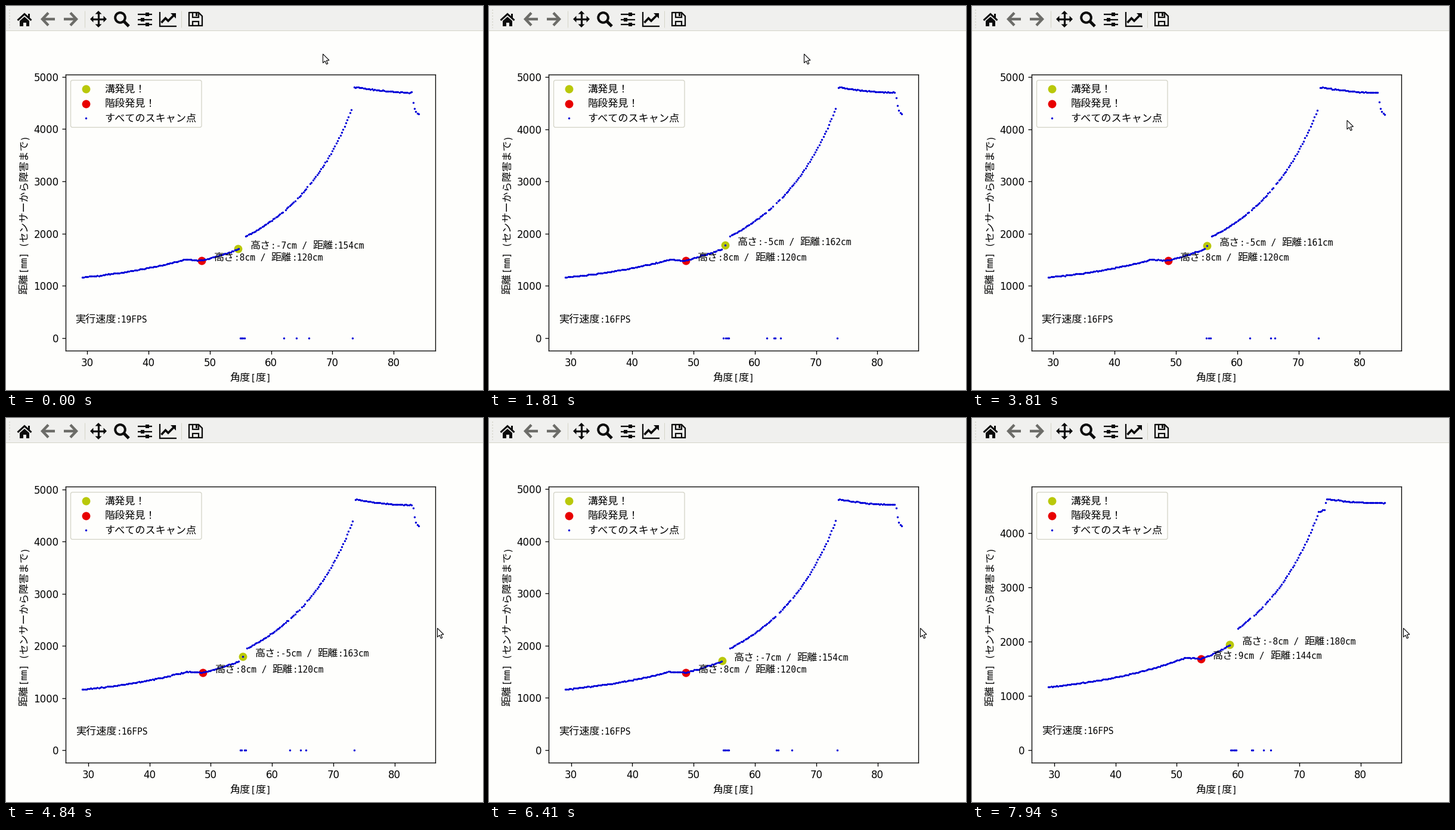
Recreate the animation shown at these times as a matplotlib script. Size 800x644 px, loop 8000 ms.

```python
import math
import random
from itertools import groupby

import matplotlib.pyplot as plt
import numpy as np
from matplotlib.animation import FuncAnimation
from matplotlib.patches import Circle, FancyBboxPatch, Polygon, Rectangle
from matplotlib.ticker import MultipleLocator

W, H, DPI = 800, 644, 128
STEP, LOOP = 40, 8000
LEFT, RIGHT, TOP, BOTTOM = 100, 720, 115, 578
PAPER, BAR, EDGE, INK, FADED = "#fefefc", "#f0f0ee", "#d4d4c8", "#0c0c0c", "#6c6c68"
GREEN, RED, BLUE = "#b9c80a", "#e80000", "#0000d8"
FULL, HALF = 17.15, 8.8  # advance of wide and narrow characters


def pt(px):
    return px * 72 / DPI


def smooth(t, start, end):
    u = min(max((t - start) / (end - start), 0), 1)
    return u * u * (3 - 2 * u)


fig = plt.figure(figsize=(W / DPI, H / DPI), dpi=DPI, facecolor=PAPER)
ax = fig.add_axes([LEFT / W, 1 - BOTTOM / H, (RIGHT - LEFT) / W, (BOTTOM - TOP) / H],
                  facecolor=PAPER)
ax.tick_params(labelsize=pt(16.67), length=pt(5.8), width=pt(1.33), pad=pt(5.8))
ax.xaxis.set_major_locator(MultipleLocator(10))
ax.yaxis.set_major_locator(MultipleLocator(1000))
for spine in ax.spines.values():
    spine.set_linewidth(pt(1.33))

ui = fig.add_axes([0, 0, 1, 1], zorder=5)
ui.set_xlim(0, W)
ui.set_ylim(H, 0)
ui.axis("off")


def line(points, width, color=INK, **style):
    xs, ys = zip(*points)
    ui.plot(xs, ys, color=color, lw=pt(width), solid_capstyle="butt",
            solid_joinstyle="miter", **style)


def shape(points, color=INK):
    ui.add_patch(Polygon(points, fc=color, lw=0))


def box(x, y, w, h, color=INK):
    ui.add_patch(Rectangle((x, y), w, h, fc=color, lw=0))


def disc(axes, size, color, x=(), y=()):
    return axes.plot(x, y, "o", ms=pt(size), mew=0, color=color)[0]


def write(x, y, text, up=False):
    """Set text on a half/full-width grid, one run per script."""
    made = []
    for narrow, run in groupby(text, str.isascii):
        run = "".join(run)
        made.append(ui.text(
            x, y, run, color="black", rotation=90 if up else 0,
            rotation_mode="anchor", ha="left", va="baseline",
            family="DejaVu Sans Mono" if narrow else "Noto Sans CJK JP",
            size=pt(HALF / 0.602 if narrow else FULL)))
        step = len(run) * (HALF if narrow else FULL)
        x, y = (x, y - step) if up else (x + step, y)
    return made


def toolbar():
    box(0, 0, W, 41, BAR)
    box(0, 41, W, 1, EDGE)
    line([(6, 6), (6, 37)], 1.5, EDGE, ls=(0, (1.3, 2)))
    for x in (131.5, 293.5):
        line([(x, 8), (x, 36)], 1, EDGE)

    # home
    line([(19.5, 24), (31, 13.5), (42.5, 24)], 3)
    box(36.5, 12.5, 3.5, 7)
    shape([(23, 25), (31, 18), (39, 25), (39, 34), (23, 34)])
    box(28.5, 27.5, 5, 7, BAR)
    # back and forward
    for tip, d in ((61, 1), (118, -1)):
        line([(tip + d, 22), (tip + 21 * d, 22)], 4.4, FADED)
        line([(tip + 10 * d, 11.5), (tip, 22), (tip + 10 * d, 32.5)], 4.4, FADED)
    # pan
    for dx, dy in ((1, 0), (-1, 0), (0, 1), (0, -1)):
        line([(155, 22), (155 + 11 * dx, 22 + 11 * dy)], 3.2)
        shape([(155 + 14 * dx, 22 + 14 * dy),
               (155 + 8.5 * dx + 5.5 * dy, 22 + 8.5 * dy + 5.5 * dx),
               (155 + 8.5 * dx - 5.5 * dy, 22 + 8.5 * dy - 5.5 * dx)])
    # zoom
    ui.add_patch(Circle((191.5, 19.5), 8.3, fill=False, ec=INK, lw=pt(4)))
    line([(197, 25), (206, 34)], 5)
    # sliders
    for y, knob in ((14, 237), (22.5, 229), (31, 237)):
        line([(221, y), (245, y)], 2.3)
        box(knob - 4, y - 4, 8, 8, BAR)
        box(knob - 2.8, y - 3, 5.6, 6)
    # chart
    line([(257.5, 10), (257.5, 33.5), (286, 33.5)], 2.3)
    line([(260.5, 28), (267.5, 20.5), (272, 25), (281, 16)], 3.6)
    shape([(275.5, 11.5), (285, 11.5), (285, 21)])
    # save
    line([(307, 11), (323, 11), (329, 17), (329, 33), (307, 33), (307, 10)], 2.3)
    for y, side in ((18.5, 11), (25.5, 33)):
        line([(312.5, side), (312.5, y), (323, y), (323, side)], 2.2)
    box(317.5, 11, 3, 6)


def legend():
    ui.add_patch(FancyBboxPatch((111.5, 127.5), 213.5, 73,
                                boxstyle="round,pad=3,rounding_size=3",
                                fc=PAPER, ec=EDGE, lw=pt(1.33)))
    rows = ((13.8, GREEN, "溝発見！"), (13.8, RED, "階段発見！"), (3.4, BLUE, "すべてのスキャン点"))
    for i, (size, color, text) in enumerate(rows):
        y = 139 + 24.5 * i
        disc(ui, size, color, 133.5, y)
        write(165.5, y + 5.5, text)


toolbar()
legend()
write(375, 629, "角度[度]")
write(35, 482.5, "距離[mm] (センサーから障害まで)", up=True)

groove = disc(ax, 13.8, GREEN)
stair = disc(ax, 13.8, RED)
dots = disc(ax, 3.4, BLUE)

ARROW = np.array([(0.5, 0.5), (0.5, 15.5), (4, 12.2), (6.4, 17.6), (8.8, 16.6),
                  (6.4, 11.4), (11, 11)])
pointer = ui.add_patch(Polygon(ARROW, fc="white", ec="black", lw=pt(1.1), zorder=9))
notes = []


def profile(a, p):
    """Distance by angle; p moves the stair from its near to its far place."""
    c = np.cos(np.radians(a))
    top, red = 46 + 5.5 * p, 48.7 + 5.2 * p
    edge, far, wall = 54.75 + 3.9 * p, 55.8 + 4 * p, 73.5 + 0.65 * p

    ground = (1018 + 0.095 * (a - 29) ** 2) / c
    crest = (1018 + 0.095 * (top - 29) ** 2) / np.cos(np.radians(top))
    riser = np.interp(a, [top, red], [crest, 1488 + 195 * p])
    tread = (982 + 7 * p + (6 + 16 * p) * (a - red) / 5.9) / c
    u = a - 56
    floor = np.minimum((1096 + 5.5 * u + 0.28 * u * u) / c, 4395 + 50 * (a - 73.2))
    back = 4705 - 145 * p + (100 - 40 * p) * (np.clip(83 + p - a, 0, 20) / 9) ** 2
    back -= (15 + 50 * p) * (a < wall + 0.3)
    back -= (1 - p) * 440 * (1 - np.exp(-np.clip(a - 82.95, 0, 5) / 0.35))
    return np.select([a < top, a < red, a < edge, a < far, a < wall],
                     [ground, riser, tread, 0 * a, floor], back)


def pointer_at(t):
    u = smooth(t, 3440, 4260)
    settle = 3 * (1 - smooth(t, 0, 300))
    return 528 + settle + 195 * u + 210 * u * u * (1 - u), 80 + 272 * u


def draw(i):
    t = i * STEP
    p = smooth(t, 6900, 7880)
    rnd = random.Random(i)
    fps = 16 + round(3 * math.exp(-t / 300))

    # the groove is found at its edge or at a lone echo beyond it
    offset = 0.34 * (1 - math.cos(math.tau * t / 336))
    lone = offset > 0.3 and p == 0
    if not lone:
        offset = min(offset, 0.15) * (1 - p)
    g, g_dist = 54.6 + 4 * p + offset, 1706 + 234 * p + 145 * offset
    s, s_dist = 48.7 + 5.2 * p, 1488 + 195 * p

    start = 29.05 + rnd.uniform(0, 0.2)
    angle = np.linspace(start, start + 54.83, 246)
    dist = profile(angle, p)
    dist += np.random.default_rng(i).normal(0, 3.5, angle.size) * (dist > 0)
    if lone:
        k = np.abs(angle - g).argmin()
        angle[k], dist[k] = g, g_dist
    lost = [rnd.uniform(62, 66.4) for _ in range(rnd.choice((3, 4)))]
    if p < 0.5:
        lost.append(73.4)
    for a in lost:
        dist[np.abs(angle - a).argmin()] = 0

    pad = 0.05 * (angle[-1] - angle[0])
    x0, x1 = angle[0] - pad, angle[-1] + pad
    y0, y1 = -0.05 * dist.max(), 1.05 * dist.max()
    ax.set_xlim(x0, x1)
    ax.set_ylim(y0, y1)
    dots.set_data(angle, dist)
    groove.set_data([g], [g_dist])
    stair.set_data([s], [s_dist])

    while notes:
        notes.pop().remove()
    drop = -5 if lone else round(-7 - p)
    reach = round(154 + 14.2 * offset + 26 * p)
    for a, d, text in (
            (28, 300, f"実行速度:{fps}FPS"),
            (g + 2, g_dist, f"高さ:{drop}cm / 距離:{reach}cm"),
            (s + 2, s_dist, f"高さ:{round(8 + p)}cm / 距離:{round(120 + 24 * p)}cm")):
        x = LEFT + (RIGHT - LEFT) * (a - x0) / (x1 - x0)
        y = BOTTOM - (BOTTOM - TOP) * (d - y0) / (y1 - y0)
        notes.extend(write(x, y, text))

    pointer.set_xy(ARROW + pointer_at(t))
    return []


anim = FuncAnimation(fig, draw, frames=LOOP // STEP, interval=STEP,
                     init_func=lambda: draw(0), repeat=True, repeat_delay=0)
plt.show()
```
